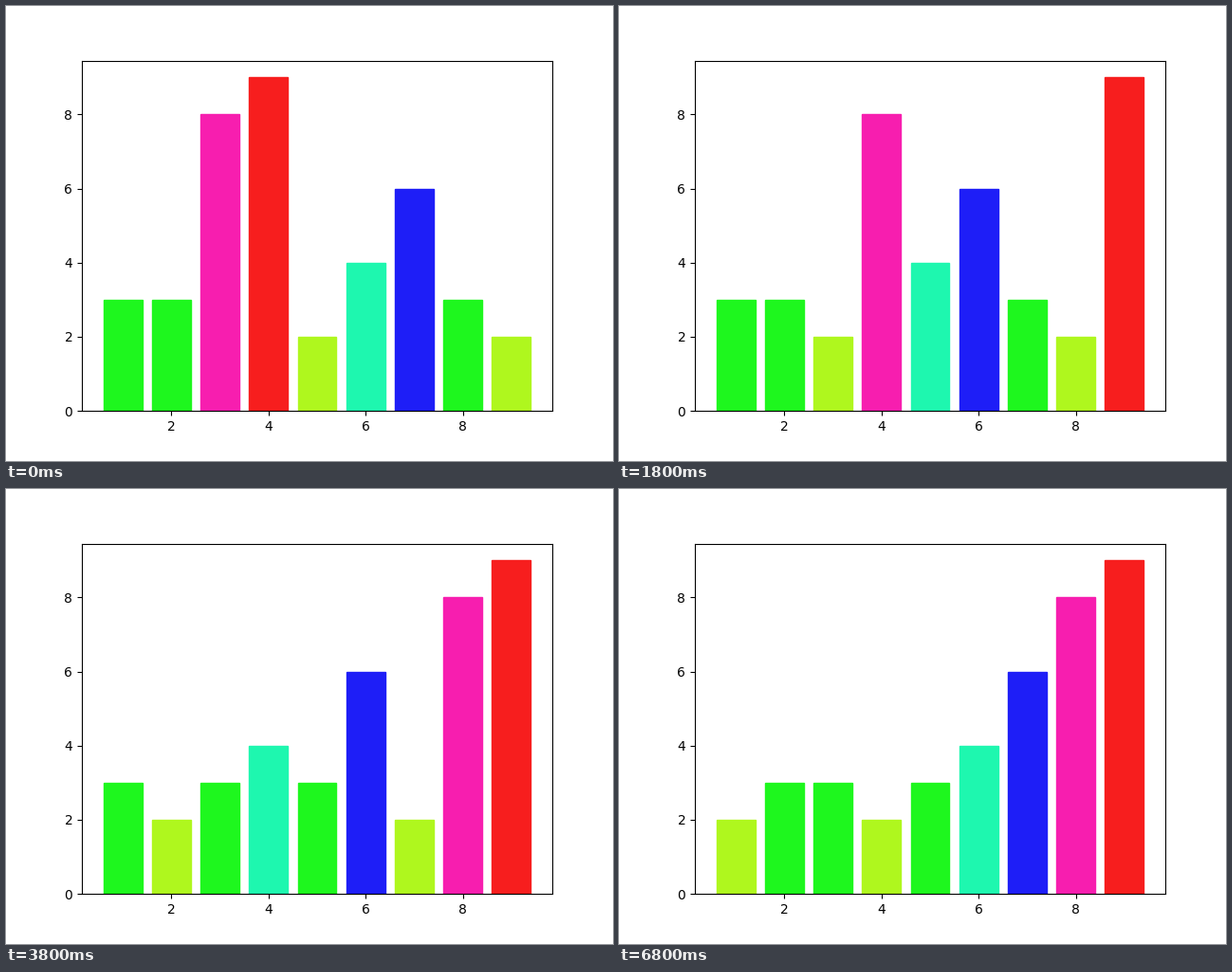
A matplotlib script for the animation above (8000 ms loop, 640 px wide and 480 px high).

```python
import colorsys

import matplotlib.pyplot as plt
from matplotlib.animation import FuncAnimation

START = [3, 3, 8, 9, 2, 4, 6, 3, 2]
STEP_MS = 200
STEPS = 40


def bar_color(value):
    return colorsys.hsv_to_rgb(value / 9 % 1, 0.88, 0.97)


def bubble_states(values, steps):
    """State after each comparison; every pass runs over the full list."""
    values = list(values)
    pairs = len(values) - 1
    states = []
    for step in range(steps):
        i = (step + 1) % pairs
        if values[i] > values[i + 1]:
            values[i], values[i + 1] = values[i + 1], values[i]
        states.append(tuple(values))
    return states


states = bubble_states(START, STEPS)

fig, ax = plt.subplots(figsize=(6.4, 4.8), dpi=100)
bars = ax.bar(range(1, len(START) + 1), START)


def update(step):
    for bar, value in zip(bars, states[step]):
        bar.set_height(value)
        bar.set_color(bar_color(value))
    return list(bars)


anim = FuncAnimation(fig, update, frames=STEPS, interval=STEP_MS,
                     repeat=True, repeat_delay=0, blit=False)
plt.show()
```
